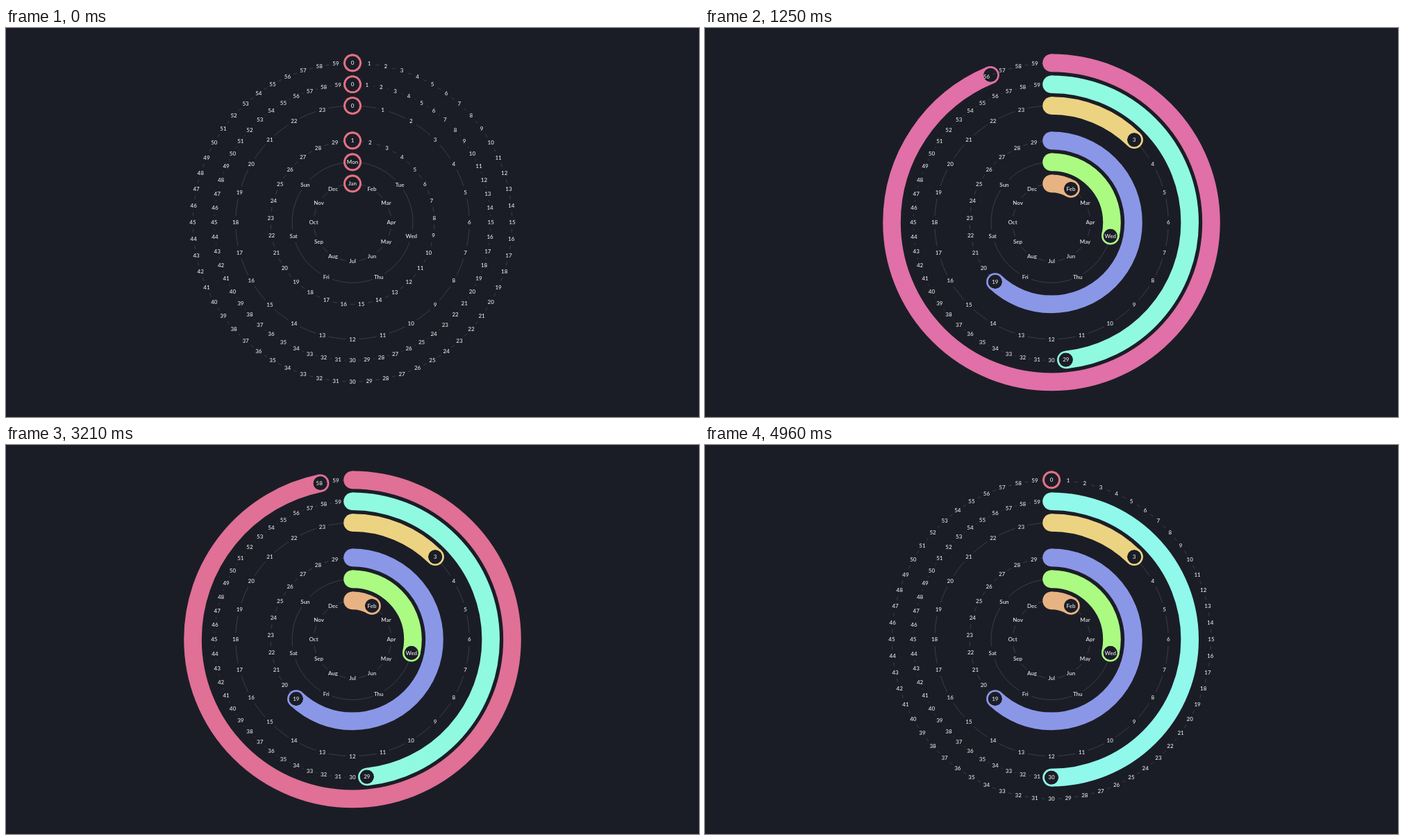
Write an HTML page with a canvas that moves like this. It is 998 by 561 pixels and loops after 5 s.

```html
<!DOCTYPE html>
<html lang="en">
<head>
<meta charset="utf-8">
<title>Polar clock</title>
<style>
html, body { margin: 0; width: 100%; height: 100%; overflow: hidden; background: #1b1d26; }
canvas { display: block; }
</style>
</head>
<body>
<canvas id="stage" width="998" height="561"></canvas>
<script>
const ctx = document.getElementById('stage').getContext('2d');
const BG = '#1b1d26', TAU = 2 * Math.PI;
const CX = 499, CY = 280.4, WIDTH = 25.6, HOLE = 10.2, GAP = 9.4;
const LOOP = 5000, FPS = 24;
const FIRST_TICK = 197, TICK = 1000, DURATION = 750;
const START = (3 * 60 + 29) * 60 + 56; // 3:29:56 as seconds

const range = (n, first = 0) => Array.from({ length: n }, (_, i) => String(i + first));

// index: which label a time of day in seconds points at
const rings = [
  { radius: 230, labels: range(60), index: s => s % 60 },
  { radius: 199.2, labels: range(60), index: s => Math.floor(s / 60) % 60 },
  { radius: 168.4, labels: range(24), index: s => Math.floor(s / 3600) },
  { radius: 118, labels: range(29, 1), index: () => 18 },
  { radius: 87, labels: 'Mon Tue Wed Thu Fri Sat Sun'.split(' '), index: () => 2 },
  { radius: 56, labels: 'Jan Feb Mar Apr May Jun Jul Aug Sep Oct Nov Dec'.split(' '), index: () => 1 }
];

// evenly spaced around the dial
const wheel = ['#e07182', '#f0f482', '#90fe83', '#90f9eb', '#8872e6', '#e16ee5']
  .map(hex => [1, 3, 5].map(i => parseInt(hex.slice(i, i + 2), 16)));

function colorAt(turn) {
  const pos = turn * wheel.length, i = Math.floor(pos);
  const from = wheel[i % wheel.length], to = wheel[(i + 1) % wheel.length];
  return `rgb(${from.map((c, k) => Math.round(c + (to[k] - c) * (pos - i)))})`;
}

const easeOut = u => 1 - (1 - u) ** 4;

function valueAt(index, time) {
  const tick = Math.floor((time - FIRST_TICK) / TICK);
  if (tick < 0) return 0;
  const u = Math.min(1, (time - FIRST_TICK - tick * TICK) / DURATION);
  const from = tick ? index(START + tick - 1) : 0;
  return from + (index(START + tick) - from) * easeOut(u);
}

function pointAt(radius, turn) {
  return [CX + radius * Math.sin(turn * TAU), CY - radius * Math.cos(turn * TAU)];
}

function disc(x, y, r) {
  ctx.beginPath();
  ctx.arc(x, y, r, 0, TAU);
  ctx.fill();
}

function drawTrack({ radius, labels }) {
  const spots = labels.map((_, i) => pointAt(radius, i / labels.length));
  ctx.strokeStyle = '#3b3d47';
  ctx.lineWidth = 1;
  ctx.beginPath();
  ctx.arc(CX, CY, radius, 0, TAU);
  ctx.stroke();
  ctx.fillStyle = BG;
  spots.forEach(([x, y]) => disc(x, y, GAP));
  ctx.fillStyle = '#dcdde1';
  labels.forEach((label, i) => ctx.fillText(label, spots[i][0], spots[i][1] + 2.8));
}

function drawArc({ radius, labels, index }, time) {
  const turn = valueAt(index, time) / labels.length;
  const [x, y] = pointAt(radius, turn);
  ctx.save();
  // keep the hole at the head of the arc open
  ctx.beginPath();
  ctx.rect(0, 0, 998, 561);
  ctx.arc(x, y, HOLE, 0, TAU);
  ctx.clip('evenodd');
  ctx.strokeStyle = ctx.fillStyle = colorAt(turn);
  ctx.lineWidth = WIDTH;
  ctx.beginPath();
  ctx.arc(CX, CY, radius, -TAU / 4, -TAU / 4 + turn * TAU);
  ctx.stroke();
  disc(CX, CY - radius, WIDTH / 2);
  disc(x, y, WIDTH / 2);
  ctx.restore();
}

function draw(now) {
  const time = Math.floor((now % LOOP + 4) * FPS / 1000) * 1000 / FPS;
  ctx.fillStyle = BG;
  ctx.fillRect(0, 0, 998, 561);
  ctx.font = '600 8px Lato, "Open Sans", sans-serif';
  ctx.textAlign = 'center';
  rings.forEach(drawTrack);
  rings.forEach(ring => drawArc(ring, time));
}

const begin = performance.now();
function loop() {
  draw(performance.now() - begin);
  requestAnimationFrame(loop);
}
loop();
</script>
</body>
</html>
```
